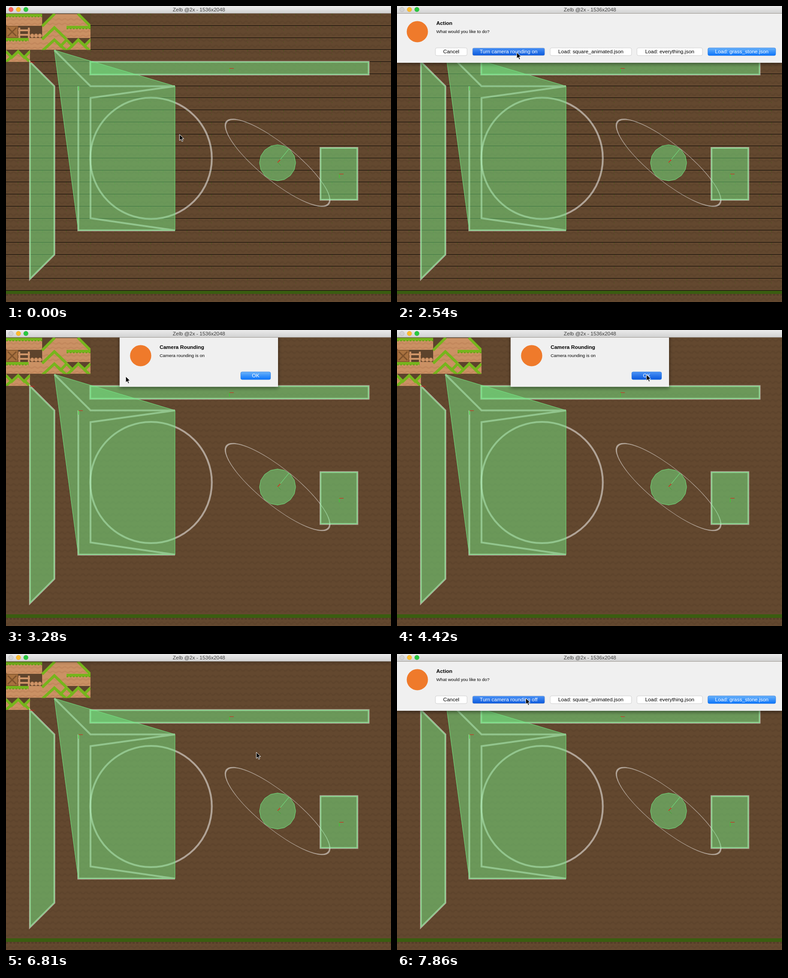
An HTML page that plays this animation: 852 px wide and 657 px high, repeating every 8 s.

```html
<!DOCTYPE html>
<html lang="en">
<head>
<meta charset="utf-8">
<title>Camera rounding</title>
<style>
html, body { margin: 0; width: 100%; height: 100%; overflow: hidden; background: #62472f; }
svg { display: block; width: 100%; height: 100%; }
text { font: 11.45px "Liberation Sans", Arial, sans-serif; fill: #000; }
.bold { font-weight: bold; }
.small { font-size: 9.85px; }
.mid { text-anchor: middle; }
.chalk { fill: none; stroke: #fff; stroke-opacity: .5; stroke-width: 4; }
.body { fill: #74e783; fill-opacity: .5; stroke: #74f08a; stroke-width: 1; stroke-opacity: .85; }
.grass { fill: none; stroke: #76b51c; stroke-width: 6; }
</style>
</head>
<body>
<svg viewBox="0 0 852 657" preserveAspectRatio="none">
  <defs>
    <pattern id="soil" width="26.72" height="26.72" y="16.8" patternUnits="userSpaceOnUse">
      <rect width="27" height="27" fill="#63482f"/>
      <path d="M0 6q3.3-4 6.7 0t6.7 0 6.7 0 6.7 0M0 19q3.3 4 6.7 0t6.7 0 6.7 0 6.7 0" fill="none" stroke="#593f29" stroke-width="4" stroke-opacity=".5"/>
    </pattern>
    <pattern id="clay" width="26.72" height="26.72" y="16.8" patternUnits="userSpaceOnUse">
      <rect width="27" height="27" fill="#cb9164"/>
      <path d="M0 13q3.3 3 6.7 0t6.7 0 6.7 0 6.7 0M0 23q3.3 3 6.7 0t6.7 0 6.7 0 6.7 0" fill="none" stroke="#b98055" stroke-width="3" stroke-opacity=".55"/>
    </pattern>
    <linearGradient id="bar" x2="0" y2="1"><stop stop-color="#ebebeb"/><stop offset="1" stop-color="#d2d2d2"/></linearGradient>
    <linearGradient id="blue" x2="0" y2="1"><stop stop-color="#6bb3fa"/><stop offset="1" stop-color="#0a74fb"/></linearGradient>
    <linearGradient id="deep" x2="0" y2="1"><stop stop-color="#4b93f6"/><stop offset="1" stop-color="#0a58dc"/></linearGradient>
    <filter id="shade" x="-10%" y="-10%" width="120%" height="130%"><feDropShadow dx="0" dy="3" stdDeviation="4" flood-opacity=".45"/></filter>
    <clipPath id="below"><rect y="16" width="852" height="641"/></clipPath>
    <clipPath id="sheetTiles"><path d="M0 17H187V97.5H53.4V124H0Z"/></clipPath>
  </defs>
  <rect width="852" height="657" fill="url(#soil)"/>
  <path d="M0 641H852" stroke="#4d3823" stroke-width="4" stroke-dasharray="5 3" stroke-opacity=".6"/>
  <rect y="631" width="852" height="8" fill="#3a5d10"/>
  <g id="seams"></g>
  <g id="tiles" clip-path="url(#sheetTiles)"></g>
  <g id="world"></g>
  <g id="sheets" clip-path="url(#below)"></g>
  <g id="title"></g>
  <path id="cursor" d="M0 0V13.6L3.2 10.7 5.4 15.7 7.6 14.7 5.5 9.8H9.6Z" fill="#000" stroke="#fff" stroke-width="1"/>
</svg>
<script>
const $ = id => document.getElementById(id);
const TILE = 26.72, TOP = 16.8, LOOP = 8000;
const line = (d, color, more = '') => `<path d="${d}" fill="none" stroke="${color}" ${more}/>`;
const shape = (d, cls) => `<path class="${cls}" d="${d}"/>`;
const rect = (x, y, w, h, fill, more = '') =>
  `<rect x="${x}" y="${y}" width="${w}" height="${h}" fill="${fill}" ${more}/>`;
const text = (x, y, str, cls = '', more = '') => `<text x="${x}" y="${y}" class="${cls}" ${more}>${str}</text>`;

function drawSeams() {
  let rows = '', cols = '';
  for (let y = TOP + TILE; y < 657; y += TILE) rows += `M0 ${Math.floor(y) + .5}H852`;
  for (let x = TILE; x < 852; x += TILE) cols += `M${Math.floor(x) + .5} 17V657`;
  $('seams').innerHTML = line(cols, '#3a6212', 'stroke-dasharray="4 5 2 15.72" stroke-opacity=".6"') + line(rows, '#0a0705');
}

function drawTiles() {
  const clay = d => `<path d="${d}" fill="url(#clay)"/>`;
  const dark = d => `<path d="${d}" fill="#5d432c"/>`;
  const log = x => `<circle cx="${x}" cy="66" r="4.4" fill="#cf9568" stroke="#a06c42"/>`;
  $('tiles').innerHTML =
    dark('M0 17H187V97H53V124H0Z') +
    clay('M0 18H80V40Q80 44 76 44H4Q0 44 0 40Z') +
    clay('M0 71H187V97H53V124H0ZM80 44 107 18H160L187 44V71H80Z') +
    dark('M134 71H187L174 84 160 71 147 84Z') + dark('M0 97H53L40 111 27 97 13 111Z') +
    shape('M0 20.5H80M0 74H50M134 47H187', 'grass') +
    line('M0 24H80M0 77.5H50M134 50.5H187', '#62a016', 'stroke-dasharray="4 3" stroke-width="2"') +
    shape('M80 45 108 17M159 17 187 45M80 74 107 48 134 74M80 100 107 75 134 100M107 75 121 89 134 75', 'grass') +
    shape('M134 75 147 88 160 75 187 101M160 75 174 88 187 75M147 88 134 100M0 101 13 114 27 101 40 114 53 101M0 124 13 112M53 124 40 112', 'grass') +
    rect(1, 45, 25, 25, '#a8713f', 'stroke="#8a5a30" stroke-width="2"') +
    line('M4 48 23 67M23 48 4 67', '#7e522b', 'stroke-width="3"') +
    line('M29.5 48V71M50.5 48V71M27 54H53M27 64H53', '#cf9568', 'stroke-width="4"') +
    log(58) + log(66.5) + log(75);
}

function drawWorld() {
  const long = 'M186.5 124H802.5V152H186.5Z', box = 'M696 315H777.5V430H696Z';
  const slab = 'M53 124 107 178V552L53 606Z';
  const disc = 'M' + Array.from({ length: 16 }, (_, i) => {
    const a = i * Math.PI / 8;
    return `${(601 + 40 * Math.cos(a)).toFixed(1)} ${(348 + 40 * Math.sin(a)).toFixed(1)}`;
  }).join('L') + 'Z';
  const axes = (x, y, id = '') => line(`M${x} ${y}h10`, '#e01c14', id) + line(`M${x + .5} ${y}v9`, '#2fd62a');
  $('world').innerHTML =
    shape(slab, 'chalk') + shape(long, 'chalk') + shape(box, 'chalk') +
    shape('M107 98 187 178H374L187 204V471L374 498H160V178', 'chalk') +
    '<circle class="chalk" cx="321" cy="338" r="134.5"/>' +
    '<g transform="translate(601 348) rotate(39) scale(1 .28)"><circle class="chalk" r="145" style="stroke-width:3.6"/></g>' +
    [slab, 'M107 98 374 178V498H160Z', long, box, disc].map(d => shape(d, 'body')).join('') +
    line('M601 348 626 317.5', '#74f08a') + line('M601 347.5 607 341', '#e01c14', 'stroke-width="1.3"') +
    line('M602 348 608 354', '#36a630') +
    axes(494, 138.5) + axes(737, 373) + line('M53 124.5h10', '#e01c14') + axes(160, 178.5, 'id="hullAxis"');
}

const button = (x, w, label, id, main) =>
  rect(x, 93, w, 17, main ? 'url(#blue)' : '#fff', `id="${id}" rx="3.2" stroke="${main ? '#2d7be0' : '#c6c6c6'}" stroke-width=".8"`) +
  text(x + w / 2, 105.4, label, 'mid', `id="${id}Text"` + (main ? ' style="fill:#fff"' : ''));

function sheet(id, x, w, head, info, textX, buttons) {
  return `<g id="${id}">` + rect(x, -60, w, 186, '#f0f0f0', 'filter="url(#shade)"') +
    `<circle cx="${textX - 42}" cy="57" r="23.5" fill="#ef7a2b"/>` +
    text(textX, 42, head, 'bold') + text(textX, 60, info, 'small') + buttons + '</g>';
}

function drawSheets() {
  $('sheets').innerHTML =
    sheet('action', 0, 852, 'Action', 'What would you like to do?', 87,
      button(85, 70, 'Cancel', 'cancel') + button(167, 160, '', 'turn') +
      button(339, 180, 'Load: square_animated.json', 'square') +
      button(531, 145, 'Load: everything.json', 'every') +
      button(688, 150, 'Load: grass_stone.json', 'stone', true)) +
    sheet('alert', 251.5, 350.5, 'Camera Rounding', 'Camera rounding is on', 340, button(519.5, 66, 'OK', 'ok', true));
}

function drawTitle() {
  const light = (x, fill, edge, id = '') => `<circle ${id} cx="${x}" cy="7.8" r="5" fill="${fill}" stroke="${edge}" stroke-width=".6"/>`;
  $('title').innerHTML = rect(0, 0, 852, 16, 'url(#bar)') + line('M0 16.4H852', '#8f8a84', 'stroke-width=".9"') +
    light(11, '#fc5b57', '#df4744', 'id="close"') + light(27.5, '#fdbc2e', '#dd9e22') + light(44, '#28c83f', '#1fa932') +
    text(427, 11.7, 'Zelb @2x - 1536x2048', 'mid', 'style="fill:#3c3c3c"');
}

// start, end, steps, from, to
const MOVES = [
  [900, 1940, 7, 384, 285, 265, 106],
  [1940, 2090, 1, 265, 106, 265, 103],
  [3140, 3430, 2, 265, 103, 433, 109],
  [3520, 3820, 2, 433, 109, 552, 99],
  [4570, 4870, 2, 552, 99, 554, 218],
  [7110, 7560, 3, 554, 218, 285, 98]
];
// time, sheet, vertical offset
const SHEETS = [
  [0, '', 0], [600, 'action', -109], [900, 'action', 0], [2690, 'action', -60], [2840, '', 0],
  [2990, 'alert', -46], [3140, 'alert', 0], [4570, 'alert', -60], [4720, '', 0],
  [6810, 'action', -112], [6960, 'action', -46], [7110, 'action', 0]
];

function pointer(t) {
  const [a, b, n, x0, y0, x1, y1] = MOVES.findLast(m => t >= m[0]) || MOVES[0];
  const p = Math.max(0, Math.min(1, Math.floor((t - a) / (b - a) * n + 1e-6) / n));
  const e = n > 1 ? p * p * (3 - 2 * p) : p;
  return [x0 + (x1 - x0) * e, y0 + (y1 - y0) * e];
}

function paint(id, fill, ink) {
  $(id).setAttribute('fill', fill);
  $(id + 'Text').style.fill = ink;
}

function render(t) {
  const [, open, dy] = SHEETS.findLast(s => t >= s[0]);
  for (const id of ['action', 'alert']) {
    $(id).style.display = id === open ? '' : 'none';
    $(id).setAttribute('transform', `translate(0 ${dy})`);
  }
  const rounded = t >= 3140;
  $('seams').style.display = rounded ? 'none' : '';
  $('hullAxis').style.display = rounded ? '' : 'none';
  $('world').setAttribute('transform', `translate(0 ${rounded ? .5 : 0})`);
  $('close').setAttribute('fill', open ? '#d2d2d2' : '#fc5b57');
  $('close').setAttribute('stroke', open ? '#aaa' : '#df4744');
  const pressed = (t >= 2540 && t < 2840) || t >= 7860;
  paint('turn', pressed ? 'url(#deep)' : '#fff', pressed ? '#fff' : '#000');
  $('turnText').textContent = 'Turn camera rounding ' + (rounded ? 'off' : 'on');
  if (t < 3140) paint('ok', '#fff', '#000');
  else paint('ok', t >= 4420 ? 'url(#deep)' : 'url(#blue)', '#fff');
  $('ok').setAttribute('stroke', t < 3140 ? '#c6c6c6' : '#2d7be0');
  $('cursor').setAttribute('transform', `translate(${pointer(t)})`);
}

drawSeams();
drawTiles();
drawWorld();
drawSheets();
drawTitle();
const start = performance.now();
function tick() {
  render((performance.now() - start) % LOOP);
  requestAnimationFrame(tick);
}
tick();
</script>
</body>
</html>
```
